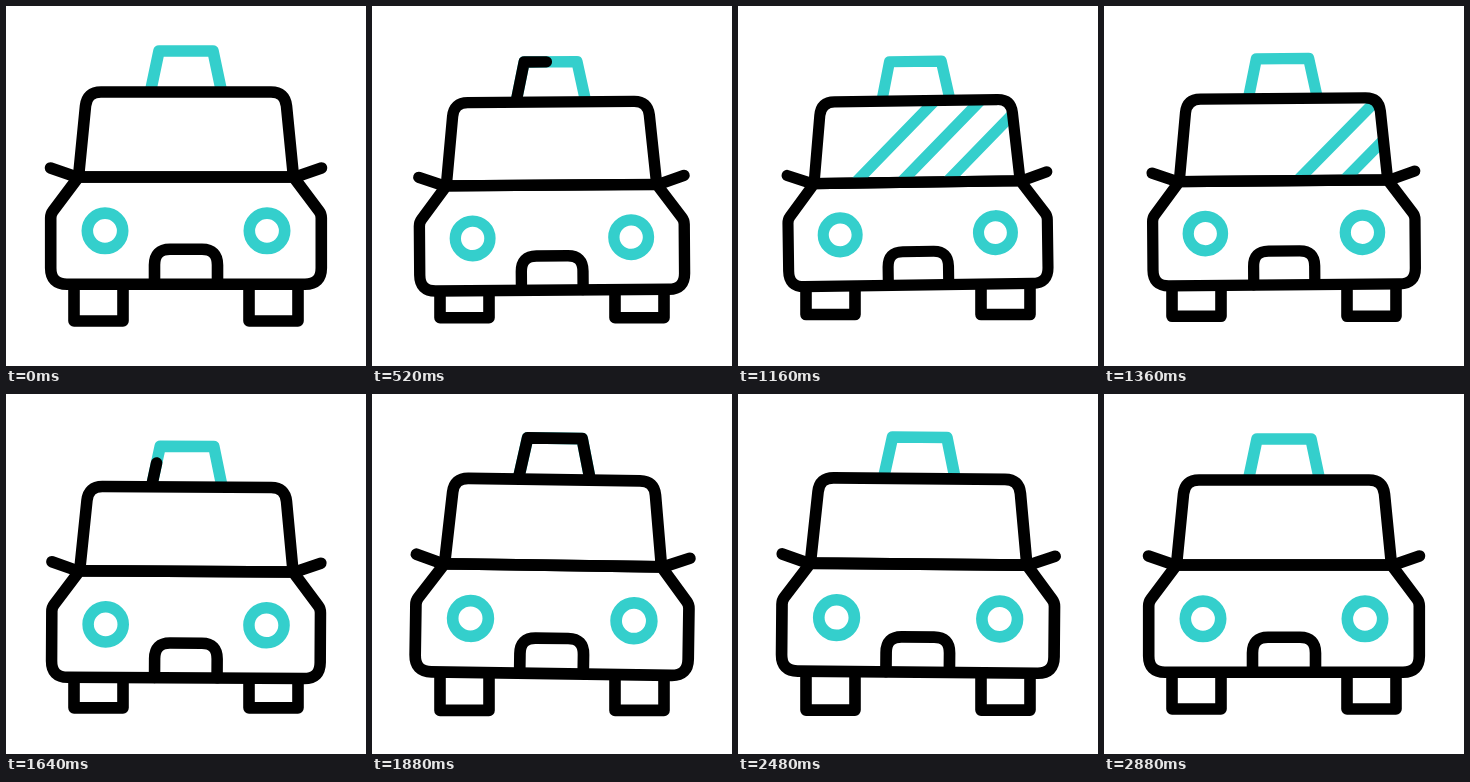
Animation, 360 px wide and 360 px high, one loop 3000 ms. Source, as an HTML page:

```html
<!DOCTYPE html>
<html lang="en">
<head>
<meta charset="utf-8">
<title>Taxi</title>
<style>
  html, body { margin: 0; width: 100%; height: 100%; overflow: hidden; background: #fff; }
  svg { display: block; width: 100vw; height: 100vh; }
  .line { fill: none; stroke: #000; stroke-width: 11.6; stroke-linecap: round; stroke-linejoin: round; }
  .teal { stroke: #34cfcc; }
</style>
</head>
<body>
<svg viewBox="0 0 360 360">
  <defs>
    <path id="glass" d="M72.500 171L79.500 100Q81 86 95 86H265Q279 86 280.500 100L287.500 171Z"/>
    <path id="sign" pathLength="125" d="M145 83L153 45H207L215 83"/>
    <clipPath id="pane"><use href="#glass"/></clipPath>
  </defs>
  <path id="wheels" class="line" d="M68 270V315H117V270M243 270V315H292V270"/>
  <g id="body">
    <use href="#sign" class="line teal"/>
    <use href="#sign" class="line" id="chaser"/>
    <path class="line" style="fill:#fff" d="M72.500 171L47 205Q44.700 208 44.700 212V262Q44.700 278.300 61 278.300H299Q315.300 278.300 315.300 262V212Q315.300 208 313 205L287.500 171Z"/>
    <g clip-path="url(#pane)">
      <path id="shine" class="line teal" d="M-180 180L-80 80M-228 180L-128 80M-276 180L-176 80"/>
    </g>
    <use href="#glass" class="line"/>
    <path class="line" d="M44.500 162L72 171.500M315.500 162L288 171.500M148.500 278V259Q148.500 243.300 164 243.300H196Q211.500 243.300 211.500 259V278"/>
    <g class="line teal">
      <circle cx="99" cy="224.800" r="17.700"/>
      <circle cx="261" cy="224.800" r="17.700"/>
    </g>
  </g>
</svg>
<script>
  const LOOP = 3000, SIGN_LENGTH = 125;
  const $ = id => document.getElementById(id);
  const progress = (t, from, to) => Math.min(1, Math.max(0, (t - from) / (to - from)));
  const ease = p => (1 - Math.cos(Math.PI * p)) / 2;
  const bump = (t, from, to) => Math.sin(Math.PI * progress(t, from, to)) ** 2;

  // Eased value through [time, value] keys
  function follow(keys, t) {
    let value = keys[0][1];
    for (let i = 1; i < keys.length; i++) {
      const [from, a] = keys[i - 1], [to, b] = keys[i];
      value += (b - a) * ease(progress(t, from, to));
    }
    return value;
  }

  const scaleKeys = [[120, 1], [940, 0.956], [1020, 0.956], [2080, 1.014], [2880, 1]];
  const tiltKeys = [[120, 0], [940, -0.9], [1020, -0.9], [2080, 1], [2880, 0]];

  function draw(t) {
    const scale = follow(scaleKeys, t);
    const tilt = follow(tiltKeys, t);
    const drop = 5.6 * (bump(t, 230, 870) + bump(t, 1350, 1990));
    $('body').setAttribute('transform',
      `translate(0 ${drop}) rotate(${tilt} 180 240) translate(180 296) scale(${scale}) translate(-180 -296)`);
    $('wheels').setAttribute('transform', `translate(0 ${155 * (scale - 1)})`);
    $('shine').setAttribute('transform', `translate(${255 + 0.396 * (t - 840)} 0)`);

    // A black stroke runs over the roof sign twice
    const run = (t - 398) % 1200;
    const head = SIGN_LENGTH * progress(run, 0, 263);
    const tail = SIGN_LENGTH * progress(run, 347, 610);
    const chaser = $('chaser').style;
    chaser.visibility = head > tail && t < 2400 ? 'visible' : 'hidden';
    chaser.strokeDasharray = `${head - tail} 999`;
    chaser.strokeDashoffset = -tail;
  }

  function tick() {
    draw(performance.now() % LOOP);
    requestAnimationFrame(tick);
  }
  tick();
</script>
</body>
</html>
```
